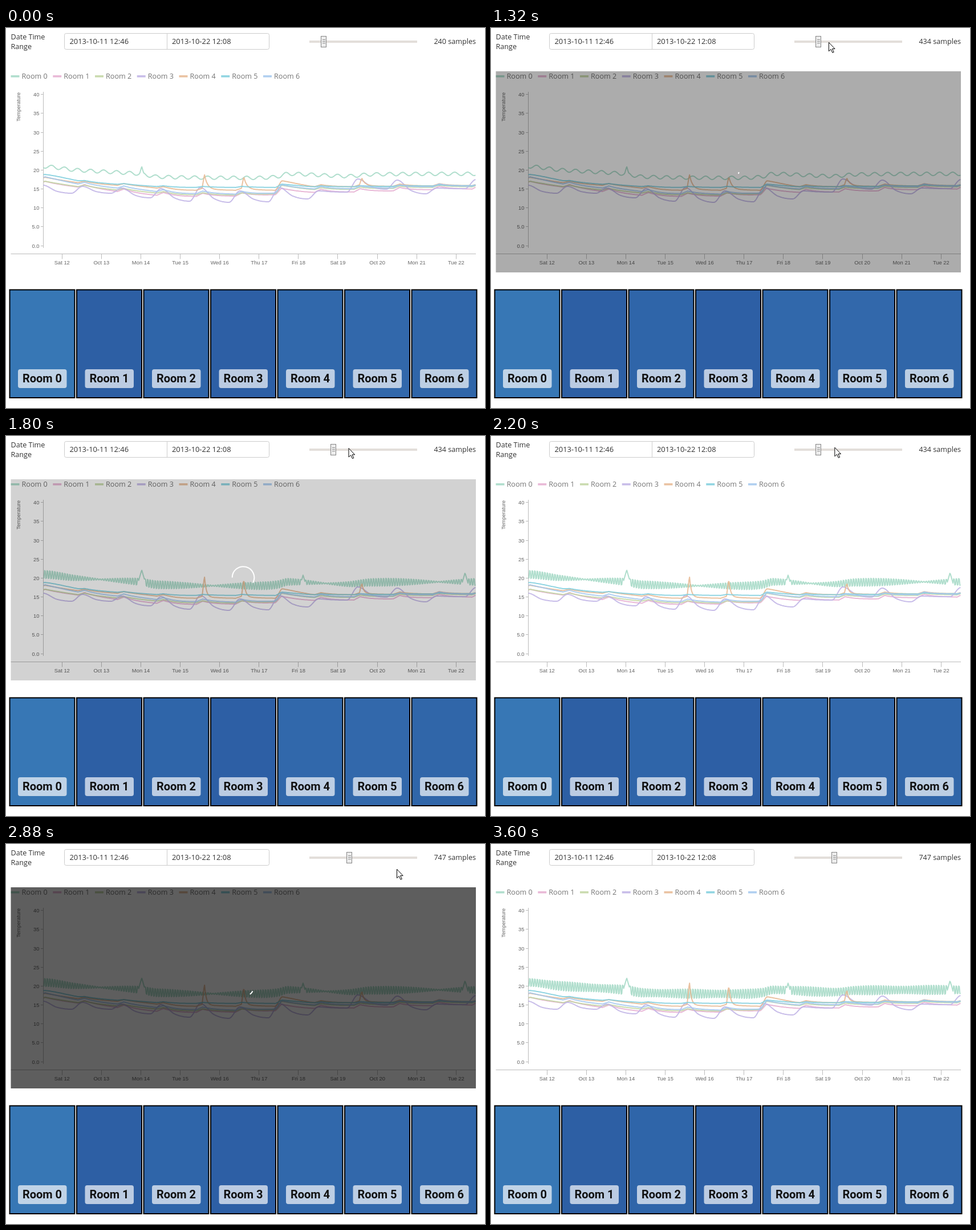
These frames come from a looping animation (840 by 667 pixels, 4160 ms). An HTML page:

```html
<!DOCTYPE html>
<html>
<head>
<meta charset="utf-8">
<style>
  html, body { margin: 0; width: 100%; height: 100%; overflow: hidden; background: #fff; }
  svg { display: block; }
  text { font-family: "Open Sans", "Noto Sans", sans-serif; font-size: 12.6px; fill: #333; }
  .input text { font-size: 12.9px; }
  .axis text { font: 9.4px "Liberation Sans", Arial, sans-serif; fill: #666; }
  .axis path { stroke: #bbb; fill: none; }
  .legend text { fill: #757575; }
  .tile text { font: bold 20px Roboto, Arial, sans-serif; fill: #111; }
  .lines path { fill: none; stroke-width: 2; stroke-linejoin: round; }
  .lines path, .legend rect { opacity: .88; }
</style>
</head>
<body>
<svg width="840" height="667" viewBox="0 0 840 667">
  <text x="8.5" y="20">Date Time</text>
  <text x="8.5" y="37">Range</text>
  <g class="input">
    <rect x="102.5" y="9.5" width="359" height="28" rx="3" fill="#fff" stroke="#ccc"/>
    <path d="M282.5 10V38" stroke="#ccc"/>
    <text x="111.5" y="28">2013-10-11 12:46</text>
    <text x="291" y="28">2013-10-22 12:08</text>
  </g>
  <rect x="532" y="22" width="189" height="4" fill="#e3deda"/>
  <g id="handle">
    <rect id="knob" x="-4.5" y="14.5" width="9" height="19" stroke="#858585"/>
    <path d="M-2 20.5h5M-2 23.5h5M-2 26.5h5" stroke="#8c8c8c"/>
  </g>
  <text id="count" x="824" y="28" text-anchor="end"></text>
  <g id="chart"></g>
  <g id="tiles"></g>
  <rect id="shade" x="8.5" y="76" width="815.5" height="353"/>
  <path id="spinner" fill="none" stroke="#fff" stroke-width="2"/>
  <path id="cursor" d="M.5 .5V16L4.2 12.6L7 18.6L9.3 17.6L6.6 11.8H11.2Z" fill="#fff" stroke="#000"/>
</svg>
<script>
const $ = id => document.getElementById(id);
const LOOP = 4160, LEFT = 65.5, RIGHT = 824, DAY = 69.1;
const colors = ['#a5dac6', '#e6b0d2', '#c3d6a4', '#c1b4e6', '#e8ba94', '#82d0de', '#a5c9ee'];
const tileColors = ['#3777b5', '#2d5fa4', '#2f65a9', '#2d5fa5', '#3168ab', '#3268ab', '#3066a9'];

const clamp = p => Math.max(0, Math.min(1, p));
const mix = (a, b, p) => a + (b - a) * p;

// Index of the segment of pts that holds x, and the part of it passed
function locate(pts, x) {
  let i = 0;
  while (i < pts.length - 2 && x > pts[i + 1][0]) i++;
  return [i, clamp((x - pts[i][0]) / (pts[i + 1][0] - pts[i][0]))];
}

// Smooth curve through the points that never overshoots
function smooth(pts, x) {
  const slope = i => {
    const a = pts[i - 1], b = pts[i], c = pts[i + 1];
    if (!a || !c || (b[1] - a[1]) * (c[1] - b[1]) <= 0) return 0;
    return (c[1] - a[1]) / (c[0] - a[0]);
  };
  const [i, p] = locate(pts, x), w = pts[i + 1][0] - pts[i][0], q = 1 - p;
  return mix(pts[i][1], pts[i + 1][1], p * p * (3 - 2 * p))
    + w * p * q * (q * slope(i) - p * slope(i + 1));
}

// Heating of the closed rooms: sharp rise and slow decay, once a day
function pulse(x) {
  const u = (x - 345 + 5 * DAY) % DAY;
  return u > 57 ? (u - 57) / 12 : Math.exp(-u / 22);
}

// Room 0: slow mean with a ripple whose look depends on the sampling
const mean = [[65, 243], [120, 249], [235, 256], [265, 261], [440, 263], [475, 261],
  [495, 256], [600, 260], [640, 257], [824, 256]];
const ripple = [
  x => -3 * Math.cos((x - 80) * 2 * Math.PI / 22.8),
  x => (1 + 8 * Math.abs(Math.sin((x - 165) * Math.PI / 198))) * Math.cos(x * 2 * Math.PI / 4.4),
  x => (9.7 + Math.sin(x / 17)) * Math.cos(x * 2 * Math.PI / 4.4)
];
function roomZero(x, level) {
  const y = smooth(mean, x) + ripple[level](x);
  const peaks = level ? [[238, 235], [521, 244], [805, 240]] : [[238, 243]];
  return Math.min(y, ...peaks.map(([px, py]) => py + 3.5 * Math.abs(x - px)));
}

// Room 3: a deep swing from each day's peak down to its trough
const peaks3 = [276, 278, 281, 282, 280, 286, 280, 286, 265, 267, 281, 266];
const troughs3 = [290, 290, 298, 304, 306, 305, 300, 288, 283, 291, 282];
const swing = peaks3.flatMap((top, i) => {
  const x = 65 + i * 69, low = troughs3[i];
  return i < 11 ? [[x, top], [x + 24, mix(top, low, .75)], [x + 50, low]] : [[x, top]];
});

// Other rooms: heights of the trend at shared places, then size of the daily pulse
const trendX = [65, 140, 240, 315, 472, 485, 550, 824];
const trends = {
  1: [275, 281, 292, 296, 293, 287, 289, 283, 6],
  2: [273, 280, 288, 293, 291, 280, 284, 279, 4],
  4: [266, 273, 279, 285, 285, 272, 279, 277, 4],
  5: [259, 270, 277, 280, 280, 276, 279, 277, 2],
  6: [266, 276, 285, 291, 290, 280, 283, 278, 5]
};
function spikes(x, level) {
  let sum = 0;
  for (const [at, size] of [[348, 38], [417, 32], [624, 18]]) {
    const u = x - at;
    sum += size * [.65, .95, 1.05][level] * (u < 0 ? Math.max(0, 1 + u / 4) : Math.exp(-u / (level ? 3 : 5)));
  }
  return sum;
}

function roomY(i, x, level) {
  if (i === 0) return roomZero(x, level);
  if (i === 3) return smooth(swing, x);
  const pts = trendX.map((tx, k) => [tx, trends[i][k]]);
  return smooth(pts, x) - trends[i][8] * pulse(x) - (i === 4 ? spikes(x, level) : 0);
}

function lines(level) {
  const paths = colors.map((c, i) => {
    const pts = [];
    for (let x = LEFT; x <= RIGHT; x += 1.1) pts.push(x.toFixed(1) + ' ' + roomY(i, x, level).toFixed(1));
    return `<path stroke="${c}" d="M${pts.join('L')}"/>`;
  });
  return `<g class="lines" id="lines${level}">${paths.join('')}</g>`;
}

function chart() {
  let legend = '', axis = '<path d="M65.5 112V386M8.5 396.5H824"/>';
  colors.forEach((c, i) => {
    const x = 8.5 + i * 73.75;
    legend += `<rect x="${x}" y="83" width="15" height="3.6" fill="${c}"/><text x="${x + 19}" y="89">Room ${i}</text>`;
  });
  for (let v = 0; v <= 40; v += 5) {
    const y = 382 - v * 6.63;
    axis += `<path d="M61 ${Math.floor(y) + .5}h4.5"/>
      <text x="58.5" y="${y + 3.5}" text-anchor="end">${v < 10 ? v.toFixed(1) : v}</text>`;
  }
  'Sat 12,Oct 13,Mon 14,Tue 15,Wed 16,Thu 17,Fri 18,Sat 19,Oct 20,Mon 21,Tue 22'.split(',').forEach((s, i) => {
    const x = 98.3 + i * DAY;
    axis += `<path d="M${Math.floor(x) + .5} 396.5v9"/><text x="${x}" y="415" text-anchor="middle">${s}</text>`;
  });
  axis += '<text transform="translate(24.5 164) rotate(-90)" style="font-size:9.1px">Temperature</text>';
  return `<g class="legend">${legend}</g><g class="axis">${axis}</g>` + [0, 1, 2].map(lines).join('');
}

$('chart').innerHTML = chart();
$('tiles').innerHTML = tileColors.map((c, i) => `<g class="tile" transform="translate(${5.5 + i * 117.5} 458.5)">
  <rect x="1" y="1" width="114" height="189.5" fill="${c}" stroke="#000" stroke-width="2"/>
  <rect x="15.5" y="140.5" width="85.5" height="33" rx="4" fill="#fff" opacity=".68"/>
  <text x="58" y="163.5" text-anchor="middle">Room ${i}</text></g>`).join('');

// Pointer: time, x, y
const pointer = [[440, 751, 97], [640, 585, 10], [720, 558.5, 25], [1000, 557, 22], [1080, 575, 18],
  [1400, 597.5, 27], [1800, 600.5, 21], [2240, 602.5, 19.5], [2760, 602.5, 19.5], [2960, 740, 60]];
const busy = [[1255, 1575], [2754, 3300]];

// Growing arc on a turning ring
function arc(ms) {
  const q = clamp(ms / 750), grow = q * q * (3 - 2 * q);
  const from = ms * .18 + grow * 100, to = from + 3 + grow * 252;
  const at = a => `${416 + 19.3 * Math.cos(a * Math.PI / 180)} ${248.5 + 19.3 * Math.sin(a * Math.PI / 180)}`;
  return `M${at(from)}A19.3 19.3 0 ${to - from > 180 ? 1 : 0} 1 ${at(to)}`;
}

function draw(now) {
  const t = Math.floor(now % LOOP / 40) * 40;
  const level = t < 1560 ? 0 : t < 3320 ? 1 : 2;
  for (let i = 0; i < 3; i++) $('lines' + i).style.display = i === level ? '' : 'none';

  const late = t >= 2440, drag = clamp((t - 1000) / 80);
  $('handle').setAttribute('transform', `translate(${late ? 602 : mix(557, 574, drag)} 0)`);
  $('knob').setAttribute('fill', t >= 680 && t < 1160 || late && t < 2840 ? '#fff' : '#ececec');
  $('count').textContent = (late ? 747 : Math.round(mix(240, 434, drag))) + ' samples';

  const [start, end] = busy[t < 2400 ? 0 : 1];
  const dim = .702 * clamp((t - start) / 140) * (1 - clamp((t - end) / 300));
  $('shade').setAttribute('opacity', dim);
  $('spinner').style.display = dim > 0 ? '' : 'none';
  $('spinner').setAttribute('d', arc(Math.max(0, t - start)));

  const [i, p] = locate(pointer.map(k => k), t), a = pointer[i], b = pointer[i + 1];
  $('cursor').style.display = t >= 440 && t < 3000 ? '' : 'none';
  $('cursor').setAttribute('transform', `translate(${mix(a[1], b[1], p)} ${mix(a[2], b[2], p)})`);
}

const begin = performance.now();
function tick() {
  draw(performance.now() - begin);
  requestAnimationFrame(tick);
}
tick();
</script>
</body>
</html>
```
